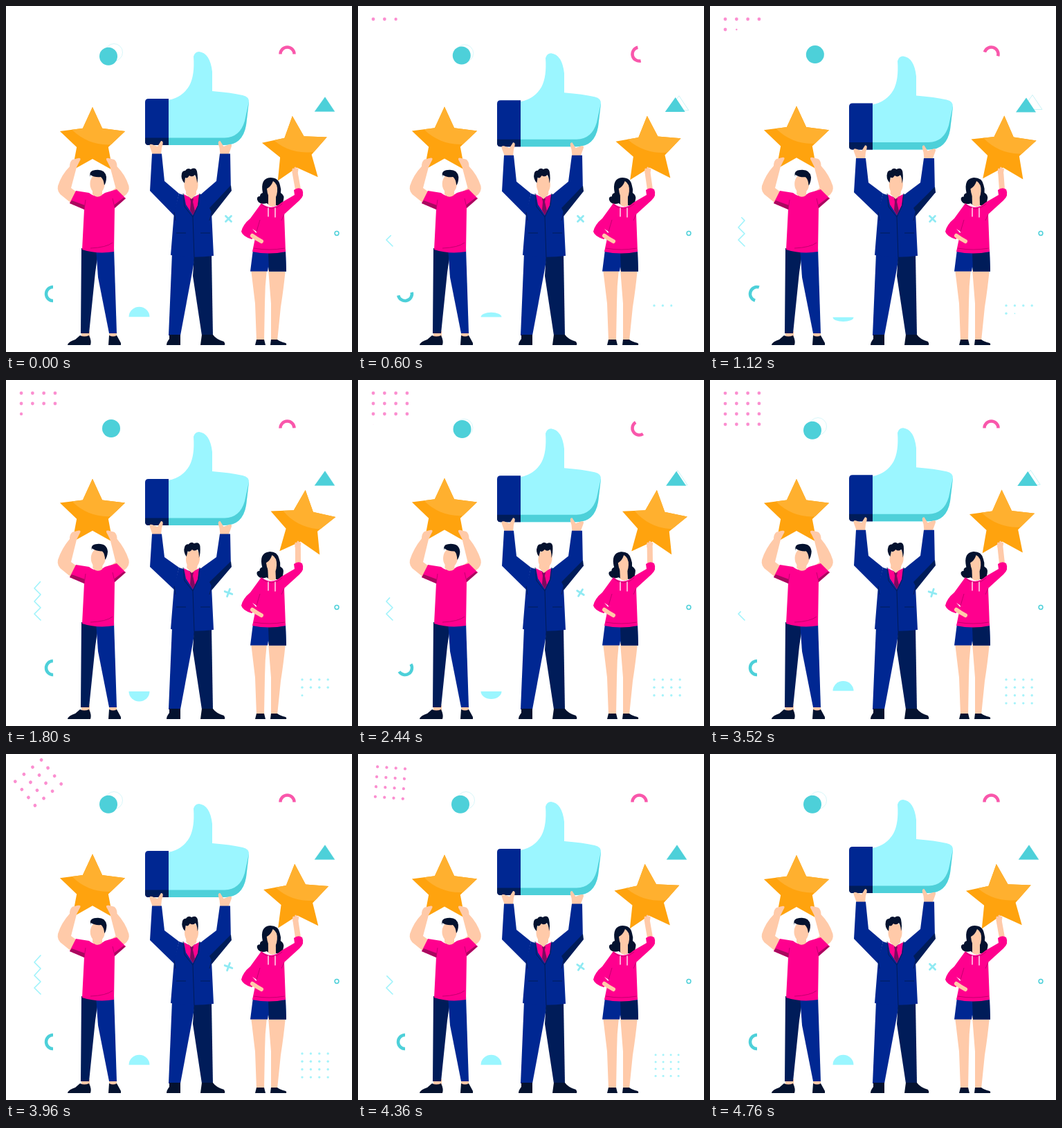
Write an HTML page that moves like this. It is 500 by 500 pixels and loops after 4.8 s.

```html
<!DOCTYPE html>
<html lang="en">
<head>
<meta charset="utf-8">
<title>Customer rating</title>
<style>
  html, body { margin: 0; width: 100%; height: 100%; overflow: hidden; background: #fff; }
  svg { display: block; width: 100vw; height: 100vh; }
  .navy { fill: #002792; } .dark { fill: #001c59; } .ink { fill: #04122f; }
  .pink { fill: #ff008e; } .plum { fill: #a8085f; } .skin { fill: #ffcaa9; }
  .cyan { fill: #9bf6ff; } .teal { fill: #4dd0d9; }
  .line { fill: none; stroke-linejoin: round; stroke-linecap: round; }
  .limb { fill: none; stroke: #ffcaa9; stroke-linejoin: round; stroke-linecap: round; }
  .seam { fill: none; stroke: #001c59; stroke-width: 1; }
  .fold { fill: none; stroke: #c4006f; stroke-width: 1; }
</style>
</head>
<body>
<svg viewBox="0 0 500 500">
  <defs>
    <clipPath id="starClip"><polygon id="starShape"/></clipPath>
    <g id="star" clip-path="url(#starClip)">
      <rect x="-52" y="-52" width="104" height="104" fill="#ffa30e"/>
      <circle cx="22" cy="-68" r="72" fill="#ffb02f"/>
    </g>
    <path id="palm" class="skin" d="M212 215L208 204Q206 199 211 200L219 203L224 195Q229 194 225 205L224 215Z"/>
  </defs>

  <!-- floating ornaments -->
  <g id="pinkDots" fill="#fb8fd0"></g>
  <g id="cyanDots" fill="#a5f3fa"></g>
  <circle id="ring" r="12.500" fill="#fff" stroke="#d8f7fa"/>
  <circle id="disc" r="13" class="teal"/>
  <path id="triLine" d="M446 152.500H475L461 131.500Z" fill="#fff" stroke="#c9f3f7"/>
  <path id="tri" d="M446 152.500H475L461 131.500Z" class="teal"/>
  <path id="arch" d="M-10 0A10 10 0 0 1 10 0" fill="none" stroke="#f957ab" stroke-width="4.500"/>
  <path id="hook" d="M0 -10A10 10 0 0 0 0 10" fill="none" stroke="#4dd0d9" stroke-width="4.500"/>
  <path id="cross" d="M-4 -4L4 4M4 -4L-4 4" class="line" stroke="#8feaf3" stroke-width="2.800"/>
  <circle cx="478" cy="328.500" r="2.900" fill="none" stroke="#4dd0d9" stroke-width="1.500"/>
  <path id="dome" d="M-15 0A15 14.500 0 0 1 15 0Z" class="cyan"/>
  <path id="zigzag" d="M50 347L41 338L50 329L41 320L50 310L41 301L50 291" pathLength="1" class="line" stroke="#a0f3fb" stroke-width="1.600" stroke-linecap="butt"/>

  <!-- left person -->
  <use id="leftStar" href="#star"/>
  <path id="arm" class="skin"/>
  <use href="#arm" transform="matrix(-1 0 0 1 252.500 0)"/>
  <path class="skin" d="M109 470H121V479H109ZM149 470H160V479H149Z"/>
  <path class="dark" d="M109 350L134 350L129 385L120 473H108Z"/>
  <path class="navy" d="M130 350H156L160 473H149L133 392Z"/>
  <path class="ink" d="M107 476Q113 479 120 476Q124 484 122 490H89Q90 485 100 482ZM149 476Q155 479 160 476L166 487V490H148Z"/>
  <path class="pink" d="M120 270Q131 279 143 270L160 265L173 278L157 292L156 355Q132 359 110 352L113 294L92 285L101 267Z"/>
  <path class="plum" d="M92 285L95 281L114 288L113 294ZM173 278L170 277L157 287V292Z"/>
  <path class="fold" d="M113 294L115 280M157 291L154 278M122 350Q145 349 154 342"/>
  <g id="headL">
    <path class="skin" d="M125 262H139V273Q132 279 125 272Z"/>
    <ellipse class="skin" cx="132" cy="257" rx="10.500" ry="14"/>
    <path class="ink" d="M122 247Q119 238 129 237Q143 235 145 247Q145 255 142 259Q141 250 137 247Q128 248 122 244Z"/>
  </g>

  <!-- middle person -->
  <path class="navy" d="M240 357H274L269 385L252 476H235Z"/>
  <path class="dark" d="M272 357H297L299 476H283L270 390Z"/>
  <path class="ink" d="M236 475H252V490H232Q232 486 236 481ZM283 475H299Q304 482 315 485Q317 488 316 490H281Z"/>
  <g id="thumb">
    <path class="cyan" d="M235 136Q255 132 265 115Q273 100 271 73Q273 66 279 66Q295 68 298 95V123Q325 125 342 129Q352 131 351 140L347 172Q342 201 316 201H235Z"/>
    <path class="teal" d="M235 190.500H316Q338 190 345 166L351 138L347 172Q342 201 316 201H235Z"/>
    <path class="navy" d="M206 134H235V201H206Q201 201 201 196V139Q201 134 206 134Z"/>
    <path class="dark" d="M201 190.500H235V201H206Q201 201 201 196Z"/>
    <use href="#palm"/>
    <use href="#palm" transform="matrix(-1 0 0 1 533.500 0)"/>
  </g>
  <path id="sleeves" class="navy"/>
  <path id="sleeveShade" class="dark"/>
  <path class="navy" d="M250 271L268 277L284 271L297 298L300 361Q270 365 238 360L243 298Z"/>
  <path class="pink" d="M257 272L268 278L279 272L277 288L270 302L260 287Z"/>
  <path fill="#7b0a5f" d="M266 278H271L270 283L273 296L270 302L266 295L267 283Z"/>
  <path class="seam" d="M256 271L258 290L270 305L278 288L280 271M270 305L272 363M246 328H260M281 328H295M243 298L245 310M297 298L294 310"/>
  <g id="headM">
    <path class="skin" d="M260 262H275V272L268 279L260 272Z"/>
    <ellipse class="skin" cx="267.500" cy="258" rx="10" ry="14.500"/>
    <path class="ink" d="M258 256Q252 250 254 242Q255 238 259 238Q262 233 267 236Q274 232 276 239Q278 250 276 256Q276 249 273 244Q269 248 265 245Q262 250 259 248Z"/>
  </g>

  <!-- right person -->
  <path class="skin" d="M354 380H377Q374 405 374 430L373 484H362L360 430ZM379 380H404Q401 410 397 435L392 484H383L383 430Z"/>
  <path class="ink" d="M362 482H373L375 490H360ZM383 482H392Q396 485 404 487Q406 488 405 490H382Z"/>
  <path class="navy" d="M357 352H404L405 383.500H380L379 377L378 383.500H353Z"/>
  <path class="dark" d="M379 356H404L405 383.500H380Z"/>
  <g id="headR">
    <path class="ink" d="M371 270Q367 249 382 248Q394 248 396 259Q398 265 397 270Q403 274 401 280Q400 290 390 288Q383 291 377 285Q366 288 363 280Q362 275 367 275Q367 271 371 270Z"/>
    <path class="skin" d="M379 272H390V288Q384 292 379 287Z"/>
    <path class="skin" d="M377 264Q383 261 386 253Q393 257 392 268Q391 279 385 280Q378 278 377 264Z"/>
  </g>
  <use id="rightStar" href="#star"/>
  <path id="forearm" class="limb" stroke-width="8"/>
  <path id="fingers" class="limb" stroke-width="3"/>
  <path class="pink" d="M369 285Q384 297 398 284L417 273L416 266Q422 261 428 265Q432 274 424 281L402 301L404 355Q380 360 356 355L362 326L356 322L364 331L355 337Q342 333 340 326Q342 316 353 307Z"/>
  <path class="limb" stroke-width="6" d="M356 332L362 336L369 340"/>
  <path class="fold" d="M368 286Q384 300 399 286M402 301L398 310M362 326L367 309M358 350Q380 354 403 350"/>
  <path class="line" stroke="#fff" stroke-width="1.300" d="M379 292V304M389 292V305"/>
</svg>
<script>
const LOOP = 4800;
const $ = id => document.getElementById(id);
const set = (id, name, value) => $(id).setAttribute(name, value);
const move = (id, value) => set(id, 'transform', value);
const clamp = v => Math.max(0, Math.min(1, v));
const ease = p => (1 - Math.cos(Math.PI * clamp(p))) / 2;
const cubic = p => (p = clamp(p)) < .5 ? 4 * p ** 3 : 1 - 4 * (1 - p) ** 3;

// Eased value at time t from a flat list: time, value, time, value, ...
function key(t, ...k) {
  let i = 0;
  while (i < k.length - 4 && t > k[i + 2]) i += 2;
  return k[i + 1] + (k[i + 3] - k[i + 1]) * ease((t - k[i]) / (k[i + 2] - k[i]));
}

const starPoints = [...Array(10).keys()].map(i => {
  const r = i % 2 ? 24 : 49.5, a = (i / 5 - .5) * Math.PI;
  return (r * Math.cos(a)).toFixed(2) + ',' + (r * Math.sin(a) * 1.02).toFixed(2);
});
set('starShape', 'points', starPoints.join(' '));

function makeDots(id, dx, dy) {
  for (let i = 0; i < 16; i++) {
    const dot = document.createElementNS('http://www.w3.org/2000/svg', 'circle');
    dot.setAttribute('cx', (i % 4 - 1.5) * dx);
    dot.setAttribute('cy', ((i >> 2) - 1.5) * dy);
    $(id).append(dot);
  }
}
makeDots('pinkDots', 16.3, 15);
makeDots('cyanDots', 12.4, 11.4);

function growDots(id, t, r) {
  [...$(id).children].forEach((dot, i) => dot.setAttribute('r', r * clamp(t / 200 - .1 - i)));
}

function drawOrnaments(t) {
  const scale = 1 - ease((t - 4250) / 510);
  growDots('pinkDots', t, 2.4);
  growDots('cyanDots', t, 1.7);
  move('pinkDots', `translate(46.5 41.5) rotate(${key(t, 3500, 0, 4500, -90)}) scale(${scale})`);
  move('cyanDots', `translate(446.6 450) scale(${scale})`);

  const u = key(t, 0, 1, 1300, 0, 1900, 0, 3200, 1, 4800, 1);
  move('disc', `translate(${152 - 4 * u} ${70 + 2.7 * u})`);
  move('ring', `translate(${152 + 4 * u} ${70 - 3 * u})`);

  const w = key(t, 0, 0, 1100, 1, 1850, 0, 2150, 0, 3080, 1, 3900, 0, 4800, 0);
  move('tri', `translate(${-4 * w} ${w})`);
  move('triLine', `translate(${5 * w} ${-3 * w})`);

  const spin = -360 * (cubic(t / 1450) + cubic((t - 1650) / 1800));
  move('arch', `translate(406.5 69.5) rotate(${spin})`);
  move('hook', `translate(68 416) rotate(${spin})`);
  const tilt = key(t, 0, 0, 1000, 0, 1800, -25, 2440, -13, 3080, -30, 3960, -25, 4700, 0);
  move('cross', `translate(321.5 307.5) rotate(${tilt})`);
  const flip = key(t, 0, 1, 1750, -1, 2100, -1, 3600, 1);
  move('dome', `translate(192.5 ${449.7 - .4 * flip}) scale(1 ${flip})`);
  const drawn = key(t, 0, 0, 1700, 1, 3350, 0, 3900, 1, 4000, 1, 4700, 0);
  set('zigzag', 'stroke-dasharray', `${drawn} 2`);
  set('zigzag', 'visibility', drawn > .01 ? 'visible' : 'hidden');
}

function drawPeople(t) {
  const lift = key(t, 0, 0, 2750, -4.5, 4800, 0);
  move('leftStar', `translate(125 ${196.5 + lift})`);
  const y = 222 + lift * .7;
  set('arm', 'd', `M92 ${y + 10}Q80 244 75 260Q73 269 82 275L98 288L109 274L94 263L102 ${y + 11}` +
    `L106 ${y + 3}Q110 ${y - 3} 104 ${y - 2}L96 ${y}Q92 ${y + 3} 92 ${y + 10}Z`);

  const drop = key(t, 0, 0, 1750, 9, 3050, .5, 4000, 6, 4740, 0);
  move('thumb', `translate(0 ${drop})`);
  const cuff = 213.5 + drop, elbow = 267 + drop / 3;
  set('sleeves', 'd', `M211 ${cuff}H225L229 ${elbow - 14}L250 271L243 303L208 ${elbow}Z` +
    `M309 ${cuff}H324L325 ${elbow}L297 303L283 271L304 ${elbow - 14}Z`);
  set('sleeveShade', 'd', `M325 ${elbow - 8}L326 ${elbow}L297 304L293 293Z`);

  const sway = key(t, 0, 0, 2440, 1, 3080, 1, 4300, 0);
  move('headL', `rotate(${5 * sway} 132 275)`);
  move('headM', `translate(${sway} 0) rotate(${7 * sway} 267 275)`);
  move('headR', `rotate(${-3 * sway} 384 288)`);

  const swing = key(t, 0, 0, 2000, 1, 4700, 0);
  move('rightStar', `rotate(${-5 + 10.5 * swing} 423 264) translate(423 209)`);
  const x = 417 + 4 * swing;
  set('forearm', 'd', `M422 265L${x + 1} 243`);
  set('fingers', 'd', `M${x - 2} 241V236M${x + 1} 240L${x + 1} 234M${x + 3} 242L${x + 4} 236`);
}

function frame(now) {
  const t = now % LOOP;
  drawOrnaments(t);
  drawPeople(t);
  requestAnimationFrame(frame);
}
frame(0);
</script>
</body>
</html>
```
